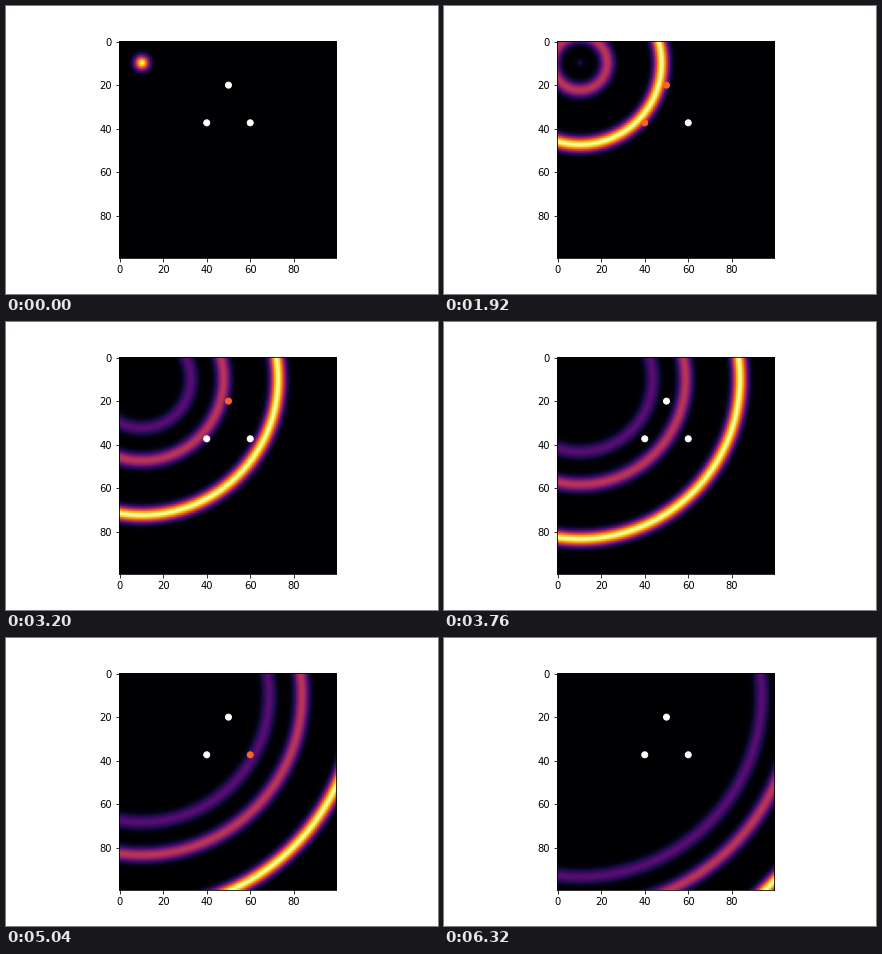
Recreate the animation shown at these times as a matplotlib script. Size 432 by 288 pixels, loop 6.4 s.

```python
import numpy as np
import matplotlib.pyplot as plt
from matplotlib.animation import FuncAnimation

FRAMES = 80
INTERVAL = 80
SIZE = 100
SPEED = 125 / FRAMES                              # cells per frame
SOURCE = (10, 10)
PULSES = [(1.0, 0), (0.5, 25), (0.25, 40)]        # strength, lag in cells
SPREAD = 10

SENSORS = np.array([(50, 20),
                    (40, 20 + 10 * np.sqrt(3)),
                    (60, 20 + 10 * np.sqrt(3))])
CHARGE = 0.45                                     # energy that makes a sensor flash
OFFSETS = np.array([0.10, 0.02, 0.15])
IDLE, ACTIVE = "white", "#fc6423"

plt.rcParams.update({
    "font.family": "DejaVu Sans",
    "font.size": 10,
    "figure.subplot.bottom": 0.125,
})


def distance(x, y):
    return np.hypot(x - SOURCE[0], y - SOURCE[1])


def wave(dist, frame):
    """Sum of the ring pulses at the given distances from the source."""
    return sum(strength * np.exp(-(dist - SPEED * frame + lag) ** 2 / SPREAD)
               for strength, lag in PULSES)


def sensor_flashes():
    """Each sensor collects energy and flashes whenever it has a full charge."""
    dist = distance(*SENSORS.T)
    energy = np.cumsum([wave(dist, k) for k in range(FRAMES)], axis=0)
    count = np.floor((energy - OFFSETS) / CHARGE)
    return np.diff(count, axis=0, prepend=count[:1]) > 0


cols, rows = np.meshgrid(np.arange(SIZE), np.arange(SIZE))
field = distance(cols, rows)
flashes = sensor_flashes()

fig, ax = plt.subplots(figsize=(6, 4), dpi=72)
image = ax.imshow(wave(field, 0), cmap="inferno", vmin=0, vmax=1)
dots = ax.scatter(*SENSORS.T, s=36, c=[IDLE] * len(SENSORS), linewidths=1)
ax.set_xlim(-0.5, SIZE - 0.5)
ax.set_ylim(SIZE - 0.5, -0.5)
ax.set_xticks(range(0, SIZE, 20))
ax.set_yticks(range(0, SIZE, 20))


def update(frame):
    image.set_data(wave(field, frame))
    colors = [ACTIVE if on else IDLE for on in flashes[frame]]
    dots.set_facecolor(colors)
    dots.set_edgecolor(colors)
    return image, dots


anim = FuncAnimation(fig, update, frames=FRAMES, interval=INTERVAL,
                     repeat=True, repeat_delay=0)
plt.show()
```
